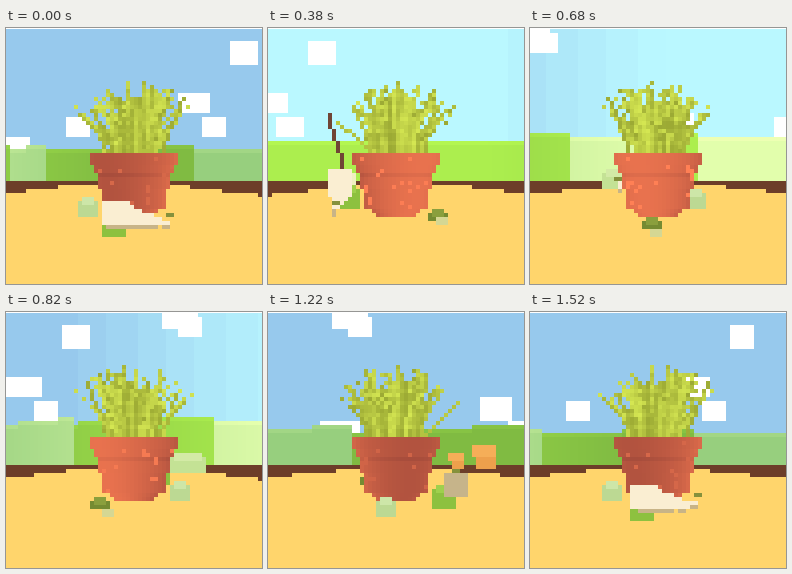
Write an HTML page with a canvas that moves like this. It is 256 px wide and 256 px high and loops after 1540 ms.

```html
<!DOCTYPE html>
<html>
<head>
<meta charset="utf-8">
<style>
  html, body { margin: 0; width: 100%; height: 100%; overflow: hidden; background: #fff; }
  canvas { position: absolute; left: 0; top: 1px; width: 256px; height: 256px; image-rendering: pixelated; }
</style>
</head>
<body>
<canvas id="stage" width="64" height="64"></canvas>
<script>
const ctx = document.getElementById('stage').getContext('2d');
const LOOP = 1540, STEP = 20, FOCAL = 290, DEG = Math.PI / 180;
const { sin, cos, asin, atan, abs, round, floor, min, max } = Math;

let seed = 7;
const rand = () => (seed = (seed * 16807) % 2147483647) / 2147483647;
const clamp = v => max(0, min(1, v));
const mix = (a, b, k) => `rgb(${a.map((v, i) => round(v + (b[i] - v) * k))})`;
const wrap = a => ((a % 360) + 360) % 360;

// Cells are 4 stage pixels; the grid starts one pixel down.
function cell(x, y, w, h, color) {
  ctx.fillStyle = color;
  ctx.fillRect(round(x), round(y), w, h);
}
function box(x, y, w, h, color) {
  cell(x / 4, (y - 1) / 4, max(1, round(w / 4)), max(1, round(h / 4)), color);
}
// A lump with a lighter cap, centred on x, y.
function lump(x, y, w, h, body, cap) {
  box(x - w / 2, y - h / 2, w, h, body);
  box(x - w / 2 + 4, y - h / 2 - 4, w - 8, 8, cap);
}

// Angles where the hills change between green and pale.
const hillEdges = [-17, 12, 66, 127, 138, 144.5, 157, 184, 203, 209, 235, 298, 324.4, 337, 343];

// Two cloud groups, repeated round the sky: angle, width in degrees, top row, rows
const scattered = [[18.3, 5, 3, 6], [-13.2, 4.8, 22, 5], [8.5, 6.5, 16, 5], [13, 4.7, 22, 5], [-24, 4, 27, 4]];
const stacked = [[-2.8, 6.5, 0, 4], [0, 4.7, 1, 5], [25.7, 5.7, 21, 6], [-5, 7, 27, 4]];
const around = (group, angles) =>
  angles.flatMap(a => group.map(([offset, ...size]) => [a + offset, ...size]));
const clouds = [...around(scattered, [0, 120, 136, 236]), ...around(stacked, [65.4, 177, 304])];

const dots = Array.from({ length: 30 }, () => ({ angle: rand() * 360, y: 32 + rand() * 13 }));
const blades = Array.from({ length: 100 }, () => ({
  angle: rand() * 360, base: rand() * 7.5, spread: 1 + 8.5 * rand() ** 2,
  height: 7 + rand() * 6 + 7 * rand() ** 3, bend: 1 + rand() * 1.5,
  tone: rand(), gap: rand() < .4
}));

function drawHill(x, world) {
  const light = clamp(.35 + .9 * cos((world + 115) * DEG));
  const a = world >= 343 ? world - 360 : world;
  let i = hillEdges.findLastIndex(edge => edge <= a);
  const pale = i % 2 === 1;
  const start = hillEdges[i] ?? -17, end = hillEdges[i + 1] ?? 360;
  const slope = clamp((a - start) / (end - start));
  const top = round(28.8 - 1.5 * cos((world - 190) * DEG) - 1.5 * slope);
  const [dim, bright] = pale
    ? [[151, 207, 126], [226, 254, 172]]
    : [[128, 187, 66], [172, 238, 78]];
  cell(x, top, 1, 42 - top, mix(dim, bright, light));
  cell(x, top, 1, 1, mix(dim, bright, light + .15));
}

function drawBackground(rot) {
  for (let x = 0; x < 64; x++) {
    const dx = x * 4 + 2 - 128;
    const world = wrap(atan(dx / FOCAL) / DEG - rot);
    const panel = (floor(world / 5.625) + .5) * 5.625;
    const light = clamp(cos((panel + 115) * DEG) * 1.4);
    cell(x, 0, 1, 40, mix([151, 201, 237], [186, 248, 255], light));

    for (const [angle, width, top, rows] of clouds)
      if (wrap(world - angle) < width) cell(x, top, 1, rows, '#fff');

    drawHill(x, world);
    const edge = round(38 + 3.4 * abs(dx / 128) ** 1.2 + .3 * sin(world * 6 * DEG));
    cell(x, 38, 1, 6, '#6d3e29');
    cell(x, edge, 1, 64 - edge, '#ffd56c');
  }
}

// Ground point on a ring around the pot; angle 0 faces the viewer.
function place(angle, radius) {
  const s = 300 / (300 - radius * cos(angle * DEG));
  return { x: 128 - radius * sin(angle * DEG) * s, y: 70 + 104 * s, front: cos(angle * DEG) > 0 };
}
// Middle distance: sweeps across behind the pot.
function far(angle, reach, draw) {
  if (cos(angle * DEG) < 0) draw(128 - reach * sin(angle * DEG));
}

function drawFar(rot) {
  far(rot + 8, 165, x => lump(x, 152, 36, 16, '#c4e295', '#d3eaa6'));
  for (const [offset, size] of [[-84.4, 16], [-73.4, 24]])
    far(rot + offset, 165, x => {
      box(x - size / 2, 157 - size, size, size / 2, '#f5ae58');
      box(x - size / 2 + 4, 157 - size / 2, size - 4, size / 2, '#eda04c');
    });
  far(rot + 76.5, 200, x => {
    for (let k = 0; k < 14; k++) box(x - 19 + k * 1.2, 85 + k * 4, 4, 4, '#704535');
    lump(x + 2, 149, 20, 12, '#eff0c0', '#f6f6d2');
  });
}

function drawTrowel(rot, front) {
  const angle = rot + 16;
  const head = place(angle, 61), tail = place(rot - 27, 62);
  if (head.front !== front) return;
  const tone = mix([198, 180, 138], [250, 238, 210], clamp(1 + 1.2 * sin(angle * DEG)));
  const headY = head.y - 15, tailY = tail.y - 3;
  const sweep = (drop, color, thick) => {
    for (let k = 0; k <= 1; k += .06) {
      const size = 4 + thick * (1 - k) ** 1.4;
      box(head.x + (tail.x - head.x) * k - size / 2,
        headY + (tailY - headY) * k - size / 2 + drop, size, size, color);
    }
  };
  sweep(4, '#c8b487', 16);
  sweep(0, tone, 20);
  box(tail.x - 4, tail.y - 14, 8, 4, '#85913c');
}

function drawBlocks(rot, front) {
  const green = place(rot + 18, 53), pale = place(rot + 87, 45), tuft = place(rot - 150, 43);
  if (green.front === front) lump(green.x, green.y + 2, 24, 20, '#8dc13f', '#9fd04d');
  if (pale.front === front) lump(pale.x, pale.y + 4, 20, 14, '#bcd993', '#cde6a8');
  if (tuft.front === front) {
    lump(tuft.x, tuft.y + 6, 20, 8, '#758b32', '#8a9f3d');
    box(tuft.x, tuft.y + 9, 12, 6, '#d5d793');
  }
}

function drawPot(rot) {
  const clay = (angle, shift) =>
    mix([178, 83, 63], [232, 114, 78], .5 + .5 * cos((angle - rot + 131) * DEG) + shift);
  for (let y = 31; y < 47; y++) {
    const inset = y < 34 ? 0 : y < 36 ? 1 : 1.7 + (y - 36) * .2 + max(0, y - 44);
    const left = round(21 + inset), half = 32 - left;
    for (let x = left; x < 64 - left; x++)
      cell(x, y, 1, 1, clay(asin((31.5 - x) / half) / DEG, y === 36 ? -.2 : 0));
  }
  for (const d of dots) {
    const angle = d.angle + rot;
    if (cos(angle * DEG) < .25) continue;
    const r = d.y < 36 ? 10 : 9 - (d.y - 36) * .2;
    cell(31.5 - r * sin(angle * DEG), floor(d.y), 1, 1, clay(0, .5));
  }
}

function drawPlant(rot) {
  const points = [];
  for (const b of blades) {
    const a = (b.angle + rot) * DEG;
    const n = round(b.height);
    for (let k = 0; k <= n; k++) {
      const t = k / n;
      if (b.gap && t > .7 && k % 2) continue;
      const r = b.base + b.spread * t ** b.bend;
      points.push({
        x: 31.5 - r * sin(a), y: 31 - b.height * t, z: r * cos(a),
        tone: clamp(b.tone * .85 + (k % 3 === 0 ? .15 : 0))
      });
    }
  }
  points.sort((p, q) => p.z - q.z);
  for (const p of points)
    cell(p.x, min(p.y + p.z * .06, 31), 1, 1, mix([156, 170, 52], [212, 230, 82], p.tone));
}

function render(now) {
  const step = floor((now % LOOP) / STEP);
  const rot = step * STEP / LOOP * 360;
  drawBackground(rot);
  drawFar(rot);
  drawBlocks(rot, false);
  drawTrowel(rot, false);
  drawPlant(rot);
  drawPot(rot);
  drawBlocks(rot, true);
  drawTrowel(rot, true);
}

const began = performance.now();
function tick() {
  render(performance.now() - began);
  requestAnimationFrame(tick);
}
tick();
</script>
</body>
</html>
```
